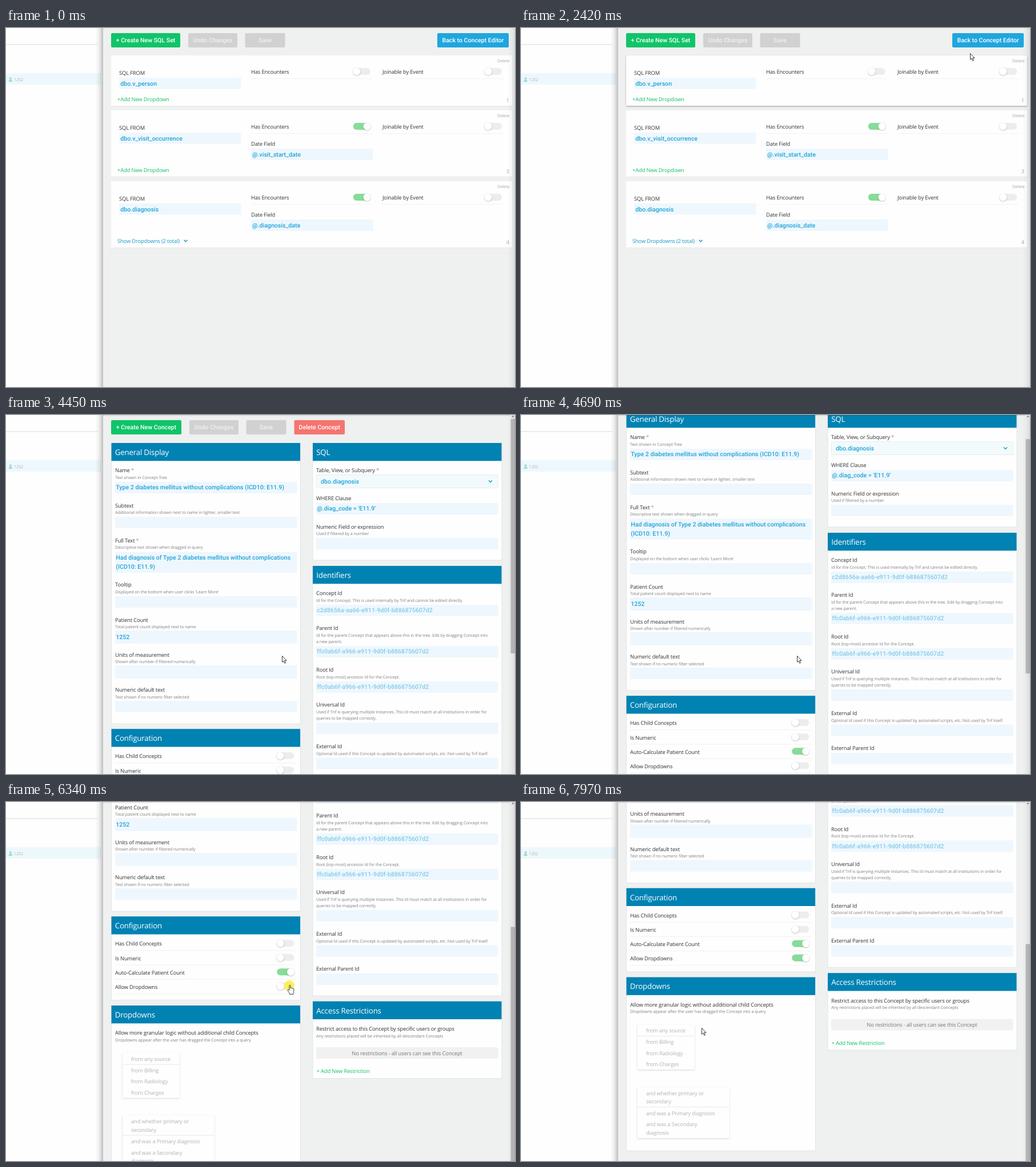
These frames come from a looping animation (891x628 px, 8 s). An HTML page:

```html
<!DOCTYPE html>
<html lang="en">
<head>
<meta charset="utf-8">
<title>Concept editor</title>
<style>
  html, body { margin: 0; width: 100%; height: 100%; overflow: hidden; background: #fefefe; }
  svg { display: block; width: 891px; height: 628px; }
  text { font: 9.36px "Open Sans", "Noto Sans", sans-serif; letter-spacing: -.014em; fill: #333; text-rendering: geometricPrecision; }
  .small { font-size: 7.35px; fill: #808080; }
  .head { font-size: 13.3px; fill: #fff; }
  .value, .button { font: 500 10.6px Roboto, sans-serif; letter-spacing: 0; fill: #1fa3d9; }
  .button { fill: #fff; text-anchor: middle; }
  .idle { fill: #f1f1f1; }
  .locked { fill: #81cbea; }
  .add { fill: #14c063; }
  .link { fill: #1597c8; }
  .faint { fill: #b2b2b2; }
  .mid { text-anchor: middle; fill: #777; }
  .end { text-anchor: end; fill: #a8a8a8; }
</style>
</head>
<body>
<svg id="stage" viewBox="0 0 891 628"></svg>
<script>
const LOOP = 8000;
const GREEN = '#10c469', GREY = '#d1d1d1', BLUE = '#1fa6de', BLUE_HOVER = '#38b1e3', RED = '#f6746f';

const rect = (x, y, w, h, fill, extra = '') =>
  `<rect x="${x}" y="${y}" width="${w}" height="${h}" fill="${fill}" ${extra}/>`;
const text = (x, y, str, cls = '') => `<text x="${x}" y="${y}" class="${cls}">${str}</text>`;
const line = (x, y, w, fill = '#f1f1f1') => rect(x, y, w, 1, fill);
const button = (x, w, label, fill, cls = '', id = '') =>
  rect(x, 9, w, 25, fill, `rx="2" ${id && `id="${id}"`}`) + text(x + w / 2, 25.3, label, 'button ' + cls);
const chevron = (x, y) =>
  `<path d="M${x - 3} ${y - 1.5}l3 3 3-3" fill="none" stroke="#1597c8" stroke-width="1.4"/>`;
const input = (x, y, w, h) => rect(x, y, w, h, '#eef7fd', 'rx="1"');

// x, y is the centre of the knob in its off position
const toggle = (x, y, on, id = '') =>
  rect(x - 6, y - 6, 30, 12, '#ededed', 'rx="6"') +
  rect(x - 6, y - 6, 30, 12, '#86dc98', `rx="6" opacity="${on ? 1 : 0}" ${id && `id="${id}Track"`}`) +
  `<circle cx="${on ? x + 18 : x}" cy="${y}" r="6.3" fill="#fff" filter="url(#knob)" ${id && `id="${id}Knob"`}/>`;

const sqlCards = [
  { y: 48, h: 88, table: 'dbo.v_person', num: 1 },
  { y: 144, h: 116, table: 'dbo.v_visit_occurrence', date: '@.visit_start_date', num: 3 },
  { y: 268, h: 116, table: 'dbo.diagnosis', date: '@.diagnosis_date', num: 4, dropdowns: true }
];

function sqlCard({ y, h, table, date, num, dropdowns }, i) {
  const foot = y + h - 8.5;
  return rect(184, y, 702, h, '#fefefe', 'rx="1" filter="url(#rest)"') +
    rect(184, y, 702, h, '#fefefe', `rx="1" filter="url(#raised)" class="hover" opacity="0"`) +
    text(198, y + 34, 'SQL FROM') + input(198, y + 39, 213.5, 19.5) + text(200.3, y + 52.8, table, 'value') +
    text(429, y + 32.4, 'Has Encounters') + toggle(613.8, y + 28, date) + line(429, y + 40, 212) +
    text(659, y + 32.4, 'Joinable by Event') + toggle(844, y + 28) + line(659, y + 40, 212) +
    (date ? text(429, y + 62.4, 'Date Field') + input(429, y + 67, 213.5, 20) + text(431, y + 81, date, 'value') : '') +
    (dropdowns
      ? text(195, foot, 'Show Dropdowns (2 total)', 'link') + chevron(314.5, foot - 3.3)
      : text(195, foot, '+Add New Dropdown', 'add')) +
    text(881.5, y + 11.5, 'Delete', 'small end') + text(881, y + h - 6, num, 'end');
}

const panel = (x, y, bottom, title) =>
  rect(x - .5, y, 331, bottom - y, '#fefefe', 'stroke="#e2e5e6"') +
  rect(x - .5, y, 330.5, 31.3, '#0082b3') + text(x + 5.7, y + 20.8, title, 'head');

// y is the label baseline; box is [top, height]
function field(x, y, label, notes, box, values = [], cls = '') {
  const name = label.replace('*', '<tspan fill="#dd7f80">*</tspan>');
  return text(x, y, name) +
    notes.map((n, i) => text(x, y + 11.6 + i * 11.1, n, 'small')).join('') +
    input(x, box[0], 318.5, box[1]) +
    values.map((v, i) => text(x + 1.3, box[0] + 13.3 + (box[1] > 21 && box[1] < 25 ? 1.8 : 0) + i * 16, v, 'value ' + cls)).join('');
}

const option = (y, str) => text(219, y, str, 'faint');
const list = (y, w, h, split) =>
  rect(204, y, w, h, '#fefefe', 'filter="url(#rest2)"') + line(204, split, w, '#e9e9e9');

const L = 191, R = 543;
const parentId = 'ffc0ab6f-a966-e911-9d0f-b886875607d2';

const editor = [
  button(184, 123, '+ Create New Concept', GREEN),
  button(321, 86, 'Undo Changes', GREY, 'idle'),
  button(420.5, 70, 'Save', GREY, 'idle'),
  button(504.5, 88.5, 'Delete Concept', RED),

  panel(185, 49, 540, 'General Display'),
  field(L, 100, 'Name *', ['Text shown in Concept Tree'], [117, 20],
    ['Type 2 diabetes mellitus without complications (ICD10: E11.9)']),
  field(L, 161.5, 'Subtext', ['Additional information shown next to name in lighter, smaller text'], [178, 20]),
  field(L, 222.7, 'Full Text *', ['Descriptive text shown when dragged in query'], [239.5, 36.5],
    ['Had diagnosis of Type 2 diabetes mellitus without complications', '(ICD10: E11.9)']),
  field(L, 300.2, 'Tooltip', ["Displayed on the bottom when user clicks 'Learn More'"], [317, 20]),
  field(L, 361.5, 'Patient Count', ['Total patient count displayed next to name'], [377, 23], ['1252']),
  field(L, 422.5, 'Units of measurement', ['Shown after number if filtered numerically'], [438, 23]),
  field(L, 484, 'Numeric default text', ['Text shown if no numeric filter selected'], [500, 20]),

  panel(185, 549.2, 695.5, 'Configuration'),
  ...['Has Child Concepts', 'Is Numeric', 'Auto-Calculate Patient Count', 'Allow Dropdowns'].map((s, i) => {
    const y = 596 + i * 25.1;
    return text(L, y + 4.4, s) + toggle(480.3, y, i === 2, i === 3 ? 'allow' : '') + line(L, y + 12.3, 318);
  }),

  panel(185, 705, 1008.5, 'Dropdowns'),
  text(L, 756, 'Allow more granular logic without additional child Concepts'),
  text(L, 767.5, 'Dropdowns appear after the user has dragged the Concept into a query', 'small'),
  list(788, 99.5, 78.5, 807.5),
  option(801.5, 'from any source'), option(821.5, 'from Billing'),
  option(841.2, 'from Radiology'), option(860.7, 'from Charges'),
  list(897.5, 160.5, 89, 931.5),
  option(911, 'and whether primary or'), option(925.6, 'secondary'),
  option(946, 'and was a Primary diagnosis'),
  option(965.6, 'and was a Secondary'), option(980.2, 'diagnosis'),

  panel(537.5, 49, 254, 'SQL'),
  text(R, 100, 'Table, View, or Subquery <tspan fill="#dd6f70">*</tspan>'),
  rect(R + .5, 104.5, 317.5, 23, '#f2fafc', 'rx="2" stroke="#e2eff3"'),
  text(551, 119.6, 'dbo.diagnosis', 'value'), chevron(848, 116),
  field(R, 149.3, 'WHERE Clause', [], [154, 20], ["@.diag_code = 'E11.9'"]),
  field(R, 198.5, 'Numeric Field or expression', ['Used if filtered by a number'], [215, 20]),

  panel(537.5, 264, 688, 'Identifiers'),
  field(R, 315, 'Concept Id', ['Id for the Concept. This is used internally by Trif and cannot be edited directly.'],
    [332, 20], ['c2d8656a-aa66-e911-9d0f-b886875607d2'], 'locked'),
  field(R, 376.4, 'Parent Id',
    ['Id for the parent Concept that appears above this in the tree. Edit by dragging Concept into', 'a new parent.'],
    [404, 20], [parentId], 'locked'),
  field(R, 449, 'Root Id', ['Root (top-most) ancestor Id for the Concept.'], [465.7, 20], [parentId], 'locked'),
  field(R, 510.4, 'Universal Id',
    ['Used if Trif is querying multiple instances. This Id must match at all institutions in order for', 'queries to be mapped correctly.'],
    [538, 20]),
  field(R, 583, 'External Id',
    ['Optional Id used if this Concept is updated by automated scripts, etc. Not used by Trif itself.'], [599.5, 20]),
  field(R, 644.4, 'External Parent Id', [], [649, 20]),

  panel(537.5, 697.7, 832.5, 'Access Restrictions'),
  text(R, 749.4, 'Restrict access to this Concept by specific users or groups'),
  text(R, 760.6, 'Any restrictions placed will be inherited by all descendant Concepts', 'small'),
  rect(R, 778, 318.5, 20, '#f1f1f1', 'rx="2"'),
  text(702, 791.7, 'No restrictions - all users can see this Concept', 'mid'),
  text(R + .5, 823.4, '+ Add New Restriction', 'add')
].join('');

const shadow = (id, dy, blur, alpha) =>
  `<filter id="${id}" x="-20%" y="-30%" width="140%" height="180%">
    <feDropShadow dx="0" dy="${dy}" stdDeviation="${blur}" flood-opacity="${alpha}"/></filter>`;
const fade = (id, dir, alpha) =>
  `<linearGradient id="${id}" ${dir}><stop offset="0" stop-opacity="0"/>
    <stop offset=".5" stop-opacity="${alpha * .3}"/><stop offset="1" stop-opacity="${alpha}"/></linearGradient>`;

const $ = id => document.getElementById(id);

$('stage').innerHTML =
  `<defs>${shadow('rest', .4, .5, .08)}${shadow('rest2', 1, 1.5, .17)}${shadow('raised', 1.2, 1.7, .3)}${shadow('knob', .7, .9, .35)}
    ${fade('left', '', .25)}${fade('right', '', .09)}${fade('top', 'x1="0" x2="0" y1="1" y2="0"', .14)}</defs>` +
  rect(0, 0, 170, 628, '#fefefe') + line(0, 28.5, 160, '#dcdcdc') + rect(0, 79, 166, 20, '#edf8fd') +
  '<g fill="#97dacd"><circle cx="8" cy="88.3" r="2"/><path d="M4.8 94c0-4.6 6.4-4.6 6.4 0z"/></g>' +
  text(13.8, 93.4, '1252', 'small faint') +
  rect(157, 0, 13, 628, 'url(#left)') + rect(170, 0, 721, 628, '#eff0f0') +
  '<g id="sets">' +
    button(184, 121, '+ Create New SQL Set', GREEN) + button(319, 86, 'Undo Changes', GREY, 'idle') +
    button(418.5, 70, 'Save', GREY, 'idle') + button(755, 125, 'Back to Concept Editor', BLUE, '', 'back') +
    sqlCards.map(sqlCard).join('') +
  '</g><g id="editor"><g id="page">' + editor + '</g>' +
    rect(170, 0, 721, 3, 'url(#top)') + rect(883, 0, 8, 628, '#f0f0f0') +
    rect(883.3, 7, 7.7, 410, '#bdbdbd', 'id="thumb"') + '<path d="M885 3.5l2.3-2.5 2.3 2.5z" fill="#777"/>' +
  '</g>' + rect(877, 0, 14, 628, 'url(#right)') +
  '<circle id="click" r="9" fill="#fbee3c"/>' +
  `<g id="pointer" fill="#fff" stroke="#222" stroke-linejoin="round">
    <path id="arrow" stroke-width=".9" d="M.5.5V11.3L2.9 9.1 4.7 13.3 6.5 12.5 4.7 8.4H8Z"/>
    <path id="hand" stroke-width=".9" d="M-1 9.2V1.2C-1-.1 1-.1 1 1.2V5.6C1.4 4.9 3 5 3 6 3.5 5.4 5 5.6 5 6.6 5.6 6 6.8 6.3 6.8 7.4V11.5C6.8 13.3 5.8 14 5.8 16.3H-.3C-.4 14.2-2 13-3.9 9.8-4.5 8.7-3.2 7.9-2.3 8.7Z"/>
  </g>`;

const stepAt = (t, from, to, n) =>
  t < from ? 0 : Math.min(n, 1 + Math.floor((t - from) / (to - from) * (n - 1) + .2));

// start, end, steps, path
const moves = [
  [70, 860, 11, [[690, 628], [705, 470], [722, 354]]],
  [1870, 2670, 11, [[722, 354], [738, 250], [760, 130], [788.6, 35.4], [803, 20]]],
  [3140, 3900, 11, [[803, 20], [770, 48], [710, 86], [682, 94]]],
  [3980, 4450, 7, [[682, 94], [610, 200], [520, 370], [483, 421]]],
  [4850, 5010, 3, [[483, 421], [484, 428]]],
  [5240, 6020, 11, [[484, 428], [500, 395], [515, 355], [506, 328], [497, 320]]],
  [7030, 7810, 11, [[497, 320], [480, 350], [425, 400], [375, 407]]],
  [7890, 7970, 2, [[375, 407], [316, 395]]]
];
const scrolls = [
  [4610, 5080, [0, 18, 58, 130, 215, 300, 348, 349]],
  [7030, 7810, [349, 349, 349, 349, 349, 349, 356, 372, 387, 395, 398, 398.5]]
];
// start, end, steps, x, y
const clicks = [[2750, 2980, 4, 802, 21], [6340, 6710, 6, 496, 321]];

const latest = (table, t) => table.filter(m => m[0] <= t).pop() || table[0];

function along(path, p) {
  const s = p * (path.length - 1), i = Math.min(Math.floor(s), path.length - 2), f = s - i;
  return path[i].map((v, k) => v + (path[i + 1][k] - v) * f);
}

function render(t) {
  const inSets = t < 2830;
  $('sets').style.display = inSets ? '' : 'none';
  $('editor').style.display = inSets ? 'none' : '';

  const [from, to, n, path] = latest(moves, t);
  const [x, y] = along(path, stepAt(t, from, to, n) / n);
  const onBack = inSets && x > 755 && y < 34;
  const onToggle = t > 5240 && t < 7030 && x < 505 && y < 331;
  $('pointer').setAttribute('transform', `translate(${x} ${y})`);
  $('pointer').style.display = t < 70 ? 'none' : '';
  $('hand').style.display = onBack || onToggle ? '' : 'none';
  $('arrow').style.display = onBack || onToggle ? 'none' : '';

  $('back').setAttribute('fill', onBack ? BLUE_HOVER : BLUE);
  document.querySelectorAll('.hover').forEach((el, i) => {
    const c = sqlCards[i];
    el.setAttribute('opacity', t >= 70 && y >= c.y - 5 && y < c.y + c.h ? 1 : 0);
  });

  const [s0, s1, values] = latest(scrolls, t);
  const top = values[stepAt(t, s0, s1, values.length - 1)];
  $('page').setAttribute('transform', `translate(0 ${-top})`);
  $('thumb').setAttribute('y', 7 + top * .606);

  const on = stepAt(t, 6420, 6580, 3) / 3;
  $('allowTrack').setAttribute('opacity', on);
  $('allowKnob').setAttribute('cx', 480.3 + 18 * on);

  const [c0, c1, steps, cx, cy] = latest(clicks, t);
  const k = stepAt(t, c0, c1, steps);
  $('click').setAttribute('cx', cx);
  $('click').setAttribute('cy', cy);
  $('click').setAttribute('opacity', k ? .85 * (steps - k) / (steps - 1) : 0);
}

const start = performance.now();
function tick(now) {
  render(Math.max(0, now - start) % LOOP);
  requestAnimationFrame(tick);
}
render(0);
requestAnimationFrame(tick);
</script>
</body>
</html>
```
